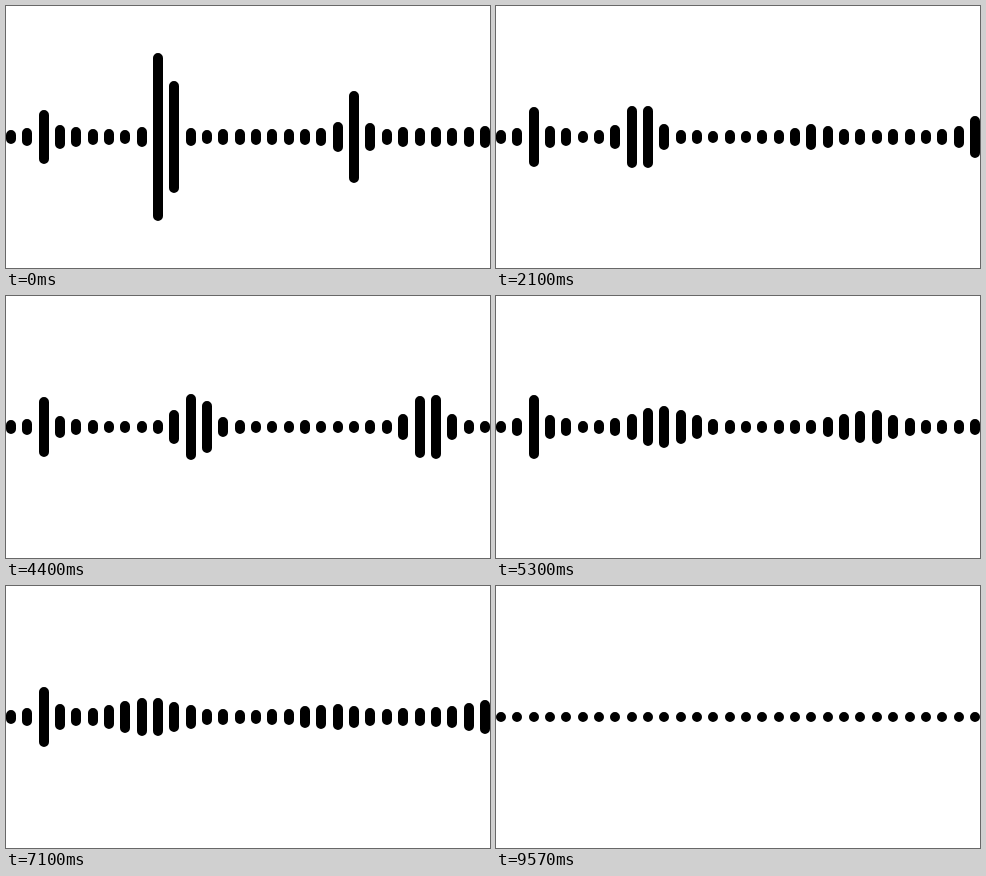
Recreate the animation shown at these times as an HTML page with a canvas. Size 484 by 262 pixels, loop 9.66 s.

```html
<!DOCTYPE html>
<html lang="en">
<head>
<meta charset="utf-8">
<title>Sound wave</title>
<style>
html, body { margin: 0; width: 100%; height: 100%; overflow: hidden; background: #fff; }
canvas { display: block; }
</style>
</head>
<body>
<canvas id="stage" width="484" height="262"></canvas>
<script>
const LOOP = 9660, LAST = 239, BARS = 30;
const GAP = 16.34, MID = 131, R = 5;
const ctx = document.getElementById('stage').getContext('2d');

// Sung notes: seconds, main bar, its power, overtone bar, its power, hiss
const notes = [
  [0, 9.38, 101, 20.97, 38, 5],
  [1.12, 8.98, 85, 19.65, 19, 4],
  [3.12, 8, 59, 18.7, 13, .6],
  [4.4, 11.25, 28, 25.5, 29, .8],
  [6.2, 8.49, 44, 19.25, 21, 1.5],
  [7.92, 8.4, 20, 20, 2, 6],
  [9.6, 9, 40, 20.5, 10, 2]
];

const mix = (a, b, k) => a + (b - a) * k;
const bell = (d, sharp) => Math.exp(-((d * sharp) ** 2));

function hash(a, b) {
  const s = Math.sin(a * 127.1 + b * 311.7) * 43758.5453;
  return s - Math.floor(s);
}

function noise(i, n) {
  const cell = Math.floor(n / 3);
  return mix(hash(i, cell), hash(i, cell + 1), n / 3 - cell);
}

// Glide between notes, fading halfway, with one loud swell every second
function voiceAt(sec) {
  const j = notes.findIndex(note => note[0] > sec);
  const from = notes[j - 1], to = notes[j];
  const k = (sec - from[0]) / (to[0] - from[0]);
  const [, peak, power, over, echo, hiss] = from.map((v, c) => mix(v, to[c], k));
  const fade = 1 - .6 * Math.sin(Math.PI * k);
  const second = Math.floor(sec);
  const loud = 95 - 15 * Math.cos(Math.PI * second / 2);
  const swell = loud * bell(sec - second - .68, 8);
  return {
    peak, over, hiss,
    power: power * fade + swell,
    echo: echo * fade + swell * .35
  };
}

function heights(n) {
  if (n >= LAST) return Array(BARS).fill(R);
  const { peak, power, over, echo, hiss } = voiceAt(n / 25);
  const sharp = Math.min(1.36, .1 + power / 40);
  const bass = 17 + 9 * noise(50, n);
  return Array.from({ length: BARS }, (_, i) =>
    5.2 + 1.4 * noise(i, n)
    + hiss * (.3 + .7 * (i / BARS) ** 3)
    + bass * bell(i - 2, 1.5) + 3 * bell(i - 3.4, .9)
    + power * bell(i - peak, sharp)
    + echo * bell(i - over, sharp)
    + power * .63 * bell(i - 1.5 * peak - 16.9, sharp));
}

// 25 steps per second, the first of every five held twice as long
function stepAt(ms) {
  const beat = Math.floor(ms / 200), rest = ms % 200;
  const k = [70, 100, 130, 170].filter(edge => rest >= edge).length;
  return Math.min(LAST, beat * 5 + k);
}

function draw(n) {
  ctx.fillStyle = '#fff';
  ctx.fillRect(0, 0, 484, 262);
  ctx.fillStyle = '#000';
  ctx.beginPath();
  heights(n).forEach((h, i) => {
    const half = Math.max(R, Math.round(h));
    ctx.roundRect(Math.round(i * GAP), MID - half, 2 * R, 2 * half, R);
  });
  ctx.fill();
}

const start = performance.now();
function tick() {
  draw(stepAt((performance.now() - start) % LOOP));
  requestAnimationFrame(tick);
}
tick();
</script>
</body>
</html>
```
